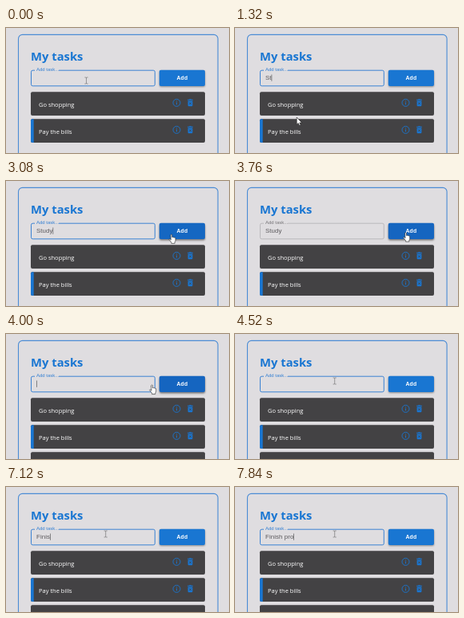
Animation, 279 px wide and 157 px high, one loop 8000 ms. Source, as an HTML page:

```html
<!DOCTYPE html>
<html lang="en">
<head>
<meta charset="utf-8">
<title>My tasks</title>
<style>
html, body { margin: 0; width: 100%; height: 100%; overflow: hidden; background: #dfdde0; }
svg { display: block; width: 100vw; height: 100vh; }
text { white-space: pre; }
.title { font: 700 14.8px "Open Sans", sans-serif; fill: #1976d2; }
.task { font: 500 7.5px "Open Sans", sans-serif; fill: #fff; }
.field { font: 400 7.9px "Liberation Sans", Arial, sans-serif; letter-spacing: .00938em; fill: #5c5a5d; }
.label { font: 400 5.9px "Liberation Sans", Arial, sans-serif; letter-spacing: .00938em; }
.button { font: 700 6.85px "Liberation Sans", Arial, sans-serif; letter-spacing: .02857em; fill: #fff; }
</style>
</head>
<body>
<svg viewBox="0 0 279 157">
  <defs>
    <filter id="soft" x="-20%" y="-40%" width="140%" height="200%"><feGaussianBlur stdDeviation="1.1"/></filter>
    <g id="icons" fill="none" stroke="#1976d2">
      <circle cx="213.5" cy="0" r="4.5" stroke-width=".9"/>
      <path d="M213.5-.5V2.4M213.5-2.5V-1.5" stroke-width=".9"/>
      <path d="M227.6-2.5H233.4V3.3Q233.4 4.3 232.4 4.3H228.6Q227.6 4.3 227.6 3.3Z" fill="#1976d2" stroke="none"/>
      <path d="M227.1-4.2H228.9L229.4-4.7H231.6L232.1-4.2H233.9V-3.2H227.1Z" fill="#1976d2" stroke="none"/>
      <path d="M229.1-.6L231.9 2.2M231.9-.6L229.1 2.2" stroke="#434244" stroke-width=".9"/>
    </g>
  </defs>
  <rect width="279" height="157" fill="#dfdde0"/>
  <rect x="15.5" y="8.4" width="249.6" height="180" rx="5" fill="none" stroke="#4b8cd5" stroke-width="1.1"/>
  <text class="title" x="31" y="41">My tasks</text>

  <path id="outline" fill="none" d="M66 53.2H184.3Q186.3 53.2 186.3 55.2V70.8Q186.3 72.8 184.3 72.8H33.5Q31.5 72.8 31.5 70.8V55.2Q31.5 53.2 33.5 53.2H36"/>
  <text id="label" class="label" x="38" y="54.3">Add task...</text>
  <text id="field" class="field" x="38" y="65.1"></text>
  <rect id="caret" y="58.5" width=".6" height="8.3" fill="#444"/>

  <rect id="shade" x="192" y="54.2" width="57" height="20" rx="2" filter="url(#soft)"/>
  <rect id="button" x="191.8" y="52.8" width="57.2" height="20.2" rx="2"/>
  <text class="button" x="220.4" y="65.2" text-anchor="middle">Add</text>

  <g id="rows"></g>
  <g id="pointer" stroke-linejoin="round" stroke-linecap="round">
    <path id="beam" d="M-1.7-4H-.5L0-3.6L.5-4H1.7M0-3.6V3.6M-1.7 4H-.5L0 3.6L.5 4H1.7" fill="none" stroke="#777" stroke-width=".7"/>
    <path id="arrow" d="M0 0V8.7L2 6.9L3.4 10L4.9 9.3L3.6 6.4H6.2Z" fill="#fff" stroke="#222" stroke-width=".6"/>
    <path id="hand" d="M-.8.6Q0-.4.8.6V3.8Q1.6 3.2 2.3 4Q3 3.5 3.7 4.3Q4.5 3.9 5.1 4.8V8Q5.1 9.2 4.2 10V11.6H0V10.3L-2.8 6.8Q-3 5.7-1.9 5.9L-.8 6.9Z" fill="#fff" stroke="#222" stroke-width=".6"/>
  </g>
</svg>
<script>
const LOOP = 8000, BLINK = 520, CLICK = 3720, ADD = 3840;
const $ = id => document.getElementById(id);
const clamp = v => Math.max(0, Math.min(1, v));

const row = (y, name, marked) =>
  `<rect x="31" y="${y}" width="218" height="29.8" rx="2" fill="#434244"/>` +
  (marked ? `<path d="M34.7 ${y}H33Q31 ${y} 31 ${y + 2}V${y + 27.8}Q31 ${y + 29.8} 33 ${y + 29.8}H34.7Z" fill="#1976d2"/>` : '') +
  `<text class="task" x="41" y="${y + 18.4}">${name}</text><use href="#icons" y="${y + 13.7}"/>`;
$('rows').innerHTML = row(80.2, 'Go shopping') + row(114.2, 'Pay the bills', true) +
  `<g id="added">${row(148.2, 'Study')}</g>`;
const added = $('added');

// [time, x, y, ease-out on the way here]
const path = [
  [0, 100.5, 66], [40, 98, 72], [200, 77.2, 112.5, 1], [2130, 77.2, 112.5], [2200, 79.2, 111.5],
  [2340, 79.2, 111.5], [2400, 92.5, 104.2], [3160, 208.2, 66.4, 1], [3440, 213.6, 64.6],
  [ADD, 213.6, 64.6], [4000, 182.6, 63.9], [4520, 124.7, 59, 1], [LOOP, 124.7, 59]
];
const words = [
  ['Study', [880, 1320, 1440, 1560, 1680]],
  ['Finish pro', [5720, 5920, 6120, 6240, 7120, 7200, 7440, 7600, 7720, 7840]]
];
const resets = [160, ADD, 6280, ...words.flatMap(w => w[1])].sort((a, b) => a - b);

function place(t) {
  const i = path.findIndex(k => k[0] > t);
  const [t0, x0, y0] = path[i - 1], [t1, x1, y1, out] = path[i];
  let p = (t - t0) / (t1 - t0);
  if (out) p = 1 - (1 - p) ** 2;
  return [x0 + (x1 - x0) * p, y0 + (y1 - y0) * p];
}

function caretOn(t) {
  if (t >= CLICK && t < ADD) return false;
  const last = resets.filter(r => r <= t).pop();
  return last !== undefined && Math.floor((t - last) / BLINK) % 2 === 0;
}

function draw(t) {
  const [x, y] = place(t);
  const kind = t < 80 || t > 4030 ? 'beam' : t > 2400 && x > 182 && y < 74 ? 'hand' : 'arrow';
  for (const id of ['beam', 'arrow', 'hand']) $(id).style.display = id === kind ? '' : 'none';
  $('pointer').setAttribute('transform', `translate(${x} ${y})`);

  const [word, times] = words[t < ADD ? 0 : 1];
  $('field').textContent = word.slice(0, times.filter(k => k <= t).length);
  $('caret').setAttribute('x', 38 + ($('field').textContent ? $('field').getComputedTextLength() : 0));
  $('caret').style.display = caretOn(t) ? '' : 'none';

  const focused = t < CLICK || t >= ADD;
  $('outline').setAttribute('stroke', focused ? '#3a82d3' : '#aaa8ab');
  $('outline').setAttribute('stroke-width', focused ? 1 : .7);
  $('label').setAttribute('fill', focused ? '#2f7dd2' : '#737174');

  const hover = clamp((t - 2860) / 250) - clamp((t - 4000) / 250);
  const mix = (a, b) => Math.round(a + (b - a) * hover);
  $('button').setAttribute('fill', `rgb(${mix(25, 21)},${mix(118, 101)},${mix(210, 192)})`);
  $('shade').setAttribute('fill', `rgba(0,0,0,${.38 + .12 * hover})`);
  $('shade').setAttribute('y', 54 + .6 * hover);

  added.style.display = t >= ADD ? '' : 'none';
}

const start = performance.now();
function tick() {
  const t = (performance.now() - start) % LOOP;
  draw(Math.floor(t / 40) * 40);
  requestAnimationFrame(tick);
}
tick();
</script>
</body>
</html>
```
